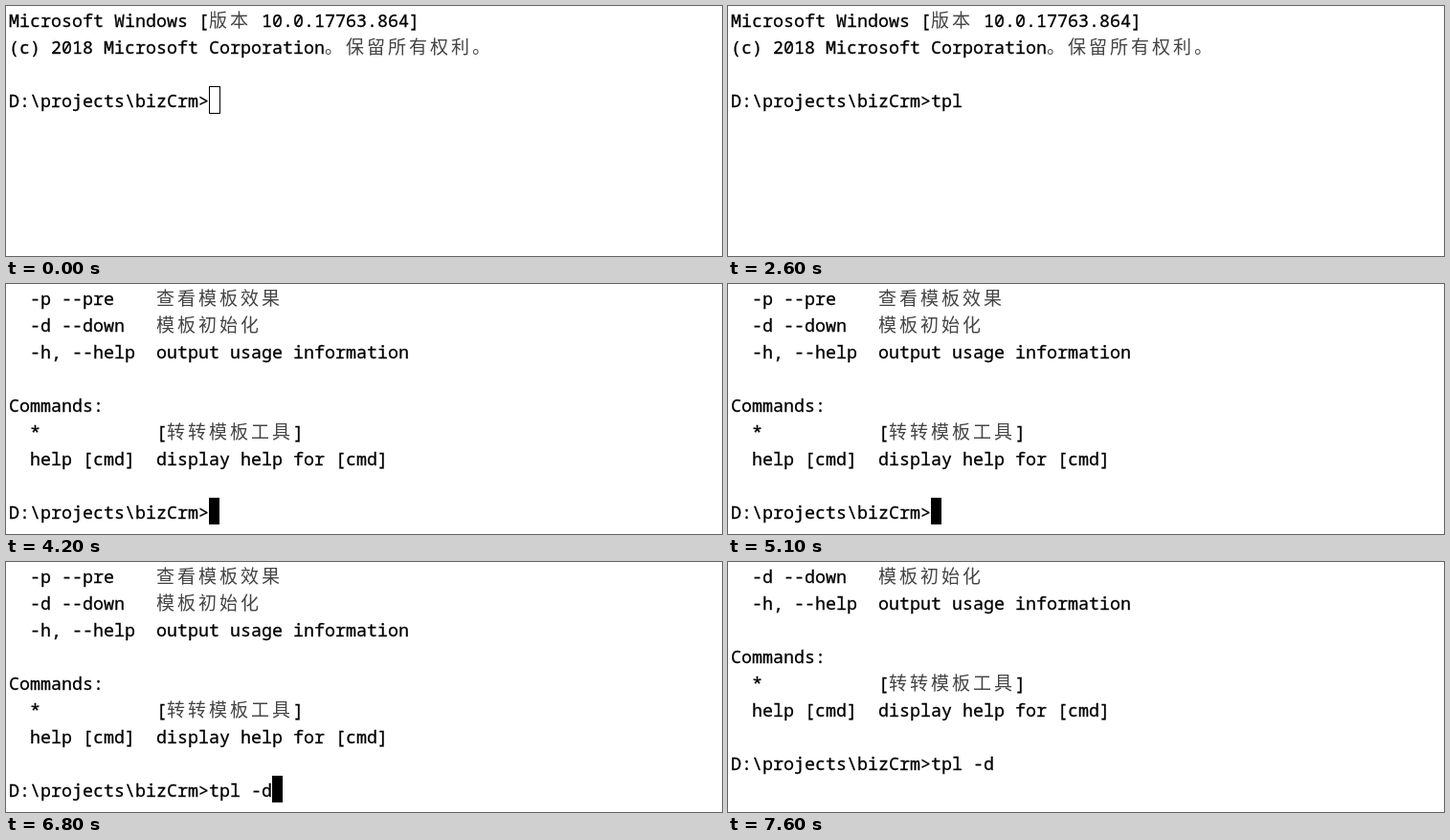
These frames come from a looping animation (748x262 px, 8 s). An HTML page:

```html
<!DOCTYPE html>
<html lang="zh-CN">
<head>
<meta charset="utf-8">
<style>
html, body { margin: 0; width: 100%; height: 100%; overflow: hidden; background: #fff; }
svg { display: block; }
text {
  font: 18.333px "Noto Sans Mono", "DejaVu Sans Mono", monospace;
  white-space: pre; font-variant-ligatures: none;
  stroke: #000; stroke-width: 0.3px;
}
.cjk { font: 300 19px "Noto Sans CJK SC", "Noto Sans CJK", sans-serif; letter-spacing: 3px; fill: #444; stroke: none; }
</style>
</head>
<body>
<svg width="748" height="262" viewBox="0 0 748 262"><g id="lines"></g><rect id="cursor"/></svg>
<script>
const LOOP = 8000, CELL = 11, ROW = 28, LEFT = 3;
const PROMPT = 'D:\\projects\\bizCrm>';
const intro = [
  'Microsoft Windows [版本 10.0.17763.864]',
  '(c) 2018 Microsoft Corporation。保留所有权利。',
  '',
  PROMPT
];
const help = [
  '  -p --pre    查看模板效果',
  '  -d --down   模板初始化',
  '  -h, --help  output usage information',
  '',
  'Commands:',
  '  *           [转转模板工具]',
  '  help [cmd]  display help for [cmd]',
  '',
  PROMPT
];
const scrolled = help.slice(1);

// [start, screen, typed text, cursor]; "next" puts the cursor on the line below
const steps = [
  [0, intro, '', 'hollow'],
  [600, intro, '', 'solid'],
  [1100, intro, '', 'off'],
  [1400, intro, 't', 'solid'],
  [1600, intro, 'tp', 'solid'],
  [1700, intro, 'tpl', 'solid'],
  [2600, intro, 'tpl', 'off'],
  [3100, intro, 'tpl', 'solid'],
  [3200, intro, 'tpl', 'next'],
  [3700, intro, 'tpl', 'off'],
  [4200, help, '', 'solid'],
  [4700, help, '', 'off'],
  [5100, help, '', 'solid'],
  [5200, help, 't', 'solid'],
  [5300, help, 'tp', 'solid'],
  [5500, help, 'tpl', 'solid'],
  [6000, help, 'tpl ', 'solid'],
  [6700, help, 'tpl -', 'solid'],
  [6800, help, 'tpl -d', 'solid'],
  [7100, scrolled, 'tpl -d', 'next'],
  [7600, scrolled, 'tpl -d', 'off']
];

const linesEl = document.getElementById('lines');
const cursorEl = document.getElementById('cursor');

function lineMarkup(line, row) {
  const body = line.replace(/>/g, '&gt;')
    .replace(/[\u3000-\u9fff]+/g, '<tspan class="cjk">$&</tspan>');
  return `<text x="${LEFT}" y="${row * ROW + 22}">${body}</text>`;
}

function placeCursor(kind, row, col) {
  const hollow = kind === 'hollow', inset = hollow ? 0.5 : 0;
  const attrs = {
    x: LEFT + col * CELL + inset, y: row * ROW + inset, width: CELL, height: ROW,
    fill: hollow ? 'none' : '#000',
    stroke: hollow ? '#000' : 'none',
    visibility: kind === 'off' ? 'hidden' : 'visible'
  };
  for (const name in attrs) cursorEl.setAttribute(name, attrs[name]);
}

function show([, screen, typed, cursor]) {
  const last = screen.length - 1;
  linesEl.innerHTML = screen
    .map((line, row) => lineMarkup(row === last ? line + typed : line, row)).join('');
  if (cursor === 'next') placeCursor('solid', last + 1, 0);
  else placeCursor(cursor, last, PROMPT.length + typed.length);
}

let current;
function tick() {
  const t = performance.now() % LOOP;
  const step = steps.filter(s => s[0] <= t).pop();
  if (step !== current) show(current = step);
  requestAnimationFrame(tick);
}
tick();
</script>
</body>
</html>
```
